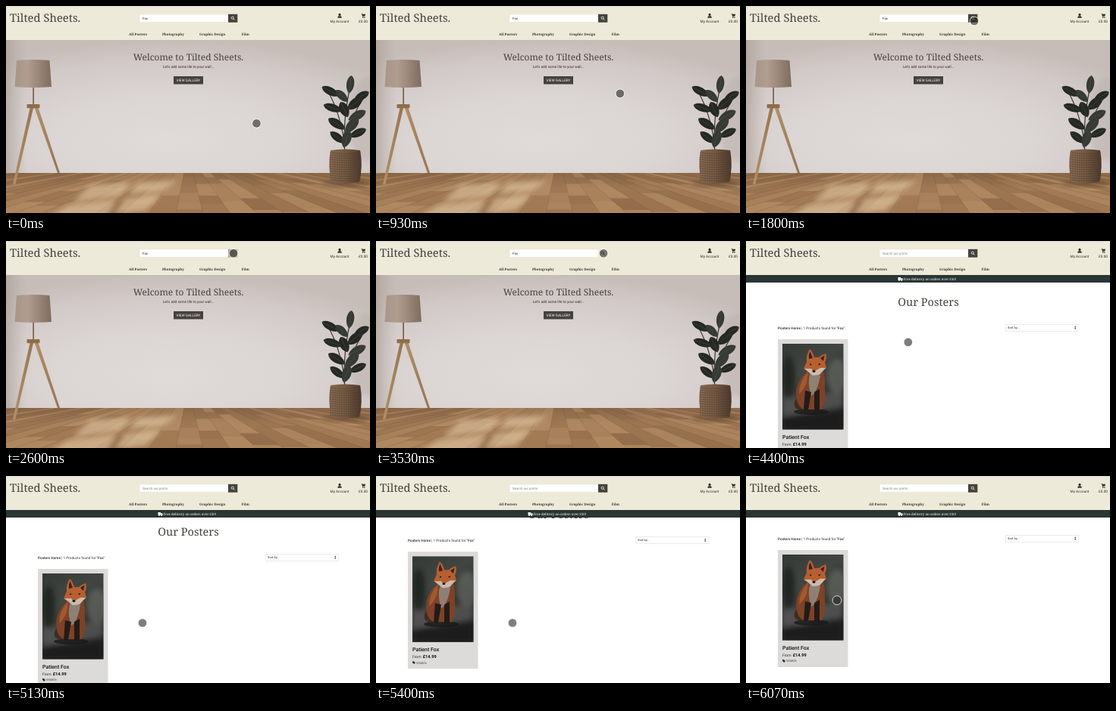
These frames come from a looping animation (480 px wide and 274 px high, 6140 ms). An HTML page:

```html
<!DOCTYPE html>
<html lang="en">
<head>
<meta charset="utf-8">
<title>Poster shop</title>
<style>
  html, body { margin: 0; width: 100%; height: 100%; overflow: hidden; background: #fff; }
  svg { display: block; width: 100vw; height: 100vh; }
  text { font-family: Roboto, sans-serif; font-size: 4.7px; fill: #2b2927; text-rendering: geometricPrecision; }
  .serif { font-family: "Noto Serif", serif; font-weight: 500; fill: #45413d; }
  .mid { text-anchor: middle; }
  .nav text { font-size: 4.45px; font-weight: 700; fill: #36332f; }
</style>
</head>
<body>
<svg viewBox="0 0 480 274" xmlns="http://www.w3.org/2000/svg">
  <defs>
    <radialGradient id="wall" cx=".45" cy=".75" r=".75">
      <stop offset="0" stop-color="#e0dad9"/>
      <stop offset=".45" stop-color="#dbd5d4"/>
      <stop offset=".8" stop-color="#d1c9c7"/>
      <stop offset="1" stop-color="#c6bdb9"/>
    </radialGradient>
    <linearGradient id="corner">
      <stop offset="0" stop-color="#a5988f" stop-opacity=".6"/>
      <stop offset="1" stop-color="#b5aaa4" stop-opacity="0"/>
    </linearGradient>
    <linearGradient id="floor" x2="0" y2="1">
      <stop offset="0" stop-color="#94704f"/>
      <stop offset=".4" stop-color="#a67f5a"/>
      <stop offset="1" stop-color="#a47c55"/>
    </linearGradient>
    <linearGradient id="shade">
      <stop offset="0" stop-color="#a8968a"/>
      <stop offset=".35" stop-color="#b09d90"/>
      <stop offset="1" stop-color="#806c5c"/>
    </linearGradient>
    <linearGradient id="wood">
      <stop offset="0" stop-color="#b3916a"/>
      <stop offset="1" stop-color="#957350"/>
    </linearGradient>
    <linearGradient id="pot">
      <stop offset="0" stop-color="#846850"/>
      <stop offset=".5" stop-color="#735842"/>
      <stop offset="1" stop-color="#4e3a2c"/>
    </linearGradient>
    <linearGradient id="dusk" x2=".5" y2="1">
      <stop offset="0" stop-color="#343936"/>
      <stop offset=".4" stop-color="#424643"/>
      <stop offset=".65" stop-color="#353735"/>
      <stop offset="1" stop-color="#1f2020"/>
    </linearGradient>
    <filter id="soft" x="-30%" y="-30%" width="160%" height="160%"><feGaussianBlur stdDeviation="3"/></filter>
    <filter id="fur"><feGaussianBlur stdDeviation=".45"/></filter>
    <clipPath id="print"><rect x="48" y="136" width="80.5" height="113.5"/></clipPath>
    <clipPath id="ground"><rect y="221" width="480" height="53"/></clipPath>
  </defs>

  <g id="home">
    <rect y="45" width="480" height="177" fill="url(#wall)"/>
    <rect y="45" width="28" height="177" fill="url(#corner)"/>
    <ellipse cx="476" cy="150" rx="26" ry="55" fill="#b3a8a2" opacity=".4" filter="url(#soft)"/>
    <rect y="221" width="480" height="53" fill="url(#floor)"/>
    <g clip-path="url(#ground)">
      <g id="planks" filter="url(#fur)"></g>
      <g fill="#e3c9a6" opacity=".6" filter="url(#soft)">
        <path d="M112 237 165 234 150 251 87 260Z"/>
        <path d="M175 234 225 231 208 244 160 250Z"/>
        <path d="M82 264 147 256 132 280 55 280Z"/>
        <path d="M157 255 205 249 185 270 142 276Z"/>
      </g>
      <ellipse cx="447" cy="235" rx="32" ry="4" fill="#4b3524" opacity=".5" filter="url(#soft)"/>
    </g>

    <path d="M35.300 106H37V131H35.300Z" fill="#7b6049"/>
    <path d="M32 133H36.500L12.500 236H9Z" fill="url(#wood)"/>
    <path d="M37 133H42L71 221H68Z" fill="url(#wood)"/>
    <rect x="27.500" y="130" width="17" height="5.300" rx="1" fill="#8f6d4b"/>
    <path d="M14 72Q36 70 57.500 72L60 107Q36 109 11.500 107Z" fill="url(#shade)"/>

    <path d="M447 196Q443 150 456 98M446 180Q440 140 425 114M449 175Q458 140 472 122" fill="none" stroke="#3a352b" stroke-width="1.2"/>
    <g id="leaves"></g>
    <path d="M428 191Q447 188 467 191 471 212 466 233 447 237 429 233 424 212 428 191Z" fill="url(#pot)"/>
    <g id="weave" fill="none" stroke="#3f2e22" stroke-width=".8" opacity=".6"></g>

    <text class="serif mid" x="240.500" y="72.300" style="font-size:12px">Welcome to Tilted Sheets.</text>
    <text class="mid" x="240.500" y="81.800">Let's add some life to your wall...</text>
    <rect x="221" y="93" width="39" height="10.500" fill="#45413d"/>
    <text class="mid" x="240.500" y="100.100" style="fill:#fff">VIEW GALLERY</text>
  </g>

  <g id="shop">
    <rect y="45" width="480" height="229" fill="#fff"/>
    <g id="scroll">
      <text class="serif mid" x="240.500" y="86.300" style="font-size:14.500px">Our Posters</text>
      <text x="42" y="116.700"><tspan font-weight="500">Posters Home</tspan> | 1 Products found for <tspan font-weight="500">"Fox"</tspan></text>
      <rect x="342.300" y="110.300" width="96.500" height="9" fill="#fff" stroke="#dedede" stroke-width=".6"/>
      <text x="345" y="116.200" style="font-size:4px">Sort by...</text>
      <path d="M433 114.300 434.200 112.600 435.400 114.300ZM433 115.300 434.200 117 435.400 115.300Z" fill="#333"/>
      <rect x="42" y="130" width="92.500" height="155" fill="#dcdbda"/>
      <g clip-path="url(#print)">
        <rect x="48" y="136" width="81" height="114" fill="url(#dusk)"/>
        <g filter="url(#soft)">
          <ellipse cx="120" cy="180" rx="13" ry="24" fill="#666a62" opacity=".7"/>
          <ellipse cx="56" cy="180" rx="9" ry="28" fill="#202522"/>
          <path d="M48 210 128 198V220L48 232Z" fill="#555655" opacity=".8"/>
          <path d="M48 234 128 224V250H48Z" fill="#1c1d1d"/>
        </g>
        <g filter="url(#fur)">
          <ellipse cx="86" cy="226" rx="23" ry="4" fill="#151515" opacity=".7"/>
          <path d="M70 205Q61 212 65 221 73 226 82 220Z" fill="#432b1f"/>
          <path d="M82 172Q67 183 66 203 67 219 76 223H100Q106 212 104 194 105 179 101 171Z" fill="#7d4227"/>
          <path d="M82 173Q70 185 70 202 75 199 80 188Z" fill="#a2592f"/>
          <path d="M85 174Q80 186 86 205 94 201 98 178Z" fill="#8f8074"/>
          <path d="M78 198 76 224H82L86 200ZM90 200 90 225H97L97 196Z" fill="#231b18"/>
          <path d="M84 143Q79 151 80 160L76 169 86 176 97 176 106 168 104 161Q107 154 105 149 99 151 96 154L90 154Q88 146 84 143Z" fill="#b75f30"/>
          <path d="M84.500 146Q82 151 83 156L88 155ZM103.500 151.500 98 155 102 159Z" fill="#37251d"/>
          <path d="M77 169 86 169 89 173 98 168 105 168 97 177 88 178Z" fill="#c9bbae"/>
          <path d="M84 162 87 163.500 84.500 164.500ZM95 163 98.500 162 97 164.500Z" fill="#17120f"/>
          <ellipse cx="89.500" cy="172.500" rx="2" ry="1.400" fill="#15120f"/>
        </g>
      </g>
      <text x="48" y="262.200" style="font-size:7px;font-weight:500;fill:#111">Patient Fox</text>
      <text x="48" y="270.500" style="font-size:5px">From</text>
      <text x="61.700" y="270.500" style="font-size:5.700px;font-weight:700;fill:#111">£14.99</text>
      <path d="M48 275H50L52 277 50.200 278.900 48 276.800Z" fill="#333"/>
      <text x="53" y="278.400" style="font-size:4.200px;fill:#555">Wildlife</text>
    </g>
    <rect y="45" width="480" height="10" fill="#2a3634"/>
    <path d="M200.500 48H204V51.700H200.500ZM204.400 49H205.700L206.600 50.300V51.700H204.400Z" fill="#fff"/>
    <circle cx="202" cy="52" r=".9" fill="#fff"/><circle cx="205.200" cy="52" r=".9" fill="#fff"/>
    <text class="serif" x="207.500" y="51.900" style="font-size:4.400px;fill:#fff">Free delivery on orders over £50!</text>
  </g>

  <rect width="480" height="45" fill="#edead9"/>
  <rect width="480" height="1.200" fill="#dddcd7"/>
  <text class="serif" x="5" y="21.400" style="font-size:14.800px">Tilted Sheets.</text>
  <rect x="176" y="11" width="117" height="10.500" fill="#fff" stroke="#dad7c9" stroke-width=".4"/>
  <text id="query" x="180" y="18" style="font-size:4.400px"></text>
  <rect id="button" x="293" y="10.800" width="12.300" height="10.900"/>
  <g id="lens" fill="none" stroke-width=".9"><circle cx="298.700" cy="15.700" r="1.600"/><path d="M299.900 16.900 301.500 18.500"/></g>
  <g class="nav">
    <text class="serif" x="162" y="38.800">All Posters</text>
    <text class="serif" x="206" y="38.800">Photography</text>
    <text class="serif" x="255" y="38.800">Graphic Design</text>
    <text class="serif" x="310.500" y="38.800">Film</text>
  </g>
  <g fill="#302d2a">
    <circle cx="440" cy="11.400" r="1.600"/>
    <path d="M437.200 15.800Q437.200 13.300 439 13.300H441Q442.800 13.300 442.800 15.800Z"/>
    <path d="M468.500 10H469.700L470 10.800H474L473.300 13.400H470.500L470.600 14H473.300V14.600H470L469.200 10.600H468.500Z"/>
    <circle cx="470.600" cy="15.400" r=".6"/><circle cx="472.900" cy="15.400" r=".6"/>
  </g>
  <text class="mid" x="440" y="22">My Account</text>
  <text class="mid" x="471" y="22">£0.00</text>

  <g id="cursor">
    <circle r="5.600" fill="#282826" fill-opacity=".6"/>
    <circle r="5.900" fill="none" stroke="#fff" stroke-opacity=".75"/>
  </g>
</svg>
<script>
const LOOP = 6140, PAGE_CHANGE = 3670;
const $ = id => document.getElementById(id);
const mix = (a, b, p) => a + (b - a) * p;
const ramp = (t, from, to) => Math.min(1, Math.max(0, (t - from) / (to - from)));
const ease = (t, from, to) => { const p = ramp(t, from, to); return p * p * (3 - 2 * p); };
const blend = (a, b, p) => `rgb(${a.map((v, i) => Math.round(mix(v, b[i], p)))})`;

let seed = 11;
const random = () => (seed = seed * 16807 % 2147483647) / 2147483647;

// Short boards lie along rays from a vanishing point behind the wall.
function drawPlanks() {
  const horizon = 195, step = .45;
  const point = (k, y) => `${240 + k * (y - horizon)} ${y}`;
  let out = "";
  for (let k = -11; k < 11; k += step) {
    for (let y = 215 + random() * 6; y < 274;) {
      const end = y + 8 + random() * 26;
      const tone = random() < .55 ? "#6e4d33" : "#cfa87d";
      out += `<path d="M${point(k, y)}L${point(k + step, y)}L${point(k + step, end)}L${point(k, end)}Z"
        fill="${tone}" opacity="${.06 + random() * .24}"/>`;
      y = end;
    }
    out += `<path d="M${point(k, 221)}L${point(k, 274)}" stroke="#5f432d" stroke-width=".5" opacity=".35"/>`;
  }
  $("planks").innerHTML = out;
}

function drawPlant() {
  const leaves = [
    [454, 104, 5, 12, 8], [428, 113, 5, 13, -62], [469, 119, 5, 11, 62],
    [443, 119, 5, 11, -45], [460, 129, 6, 12, 50], [431, 135, 5, 13, -72],
    [463, 145, 5.5, 13, 62], [446, 137, 6, 11, -25], [436, 156, 5.5, 13, -58],
    [456, 158, 6, 13, 42], [464, 168, 5, 12, 65], [437, 174, 5, 12, -52],
    [449, 176, 6, 12, 18]
  ];
  $("leaves").innerHTML = leaves.map(([x, y, rx, ry, a], i) =>
    `<g transform="translate(${x} ${y}) rotate(${a})">
      <path d="M0 ${-ry}C${rx * 1.5} ${-ry * .6} ${rx * 1.2} ${ry * .6} 0 ${ry}C${-rx * 1.2} ${ry * .6} ${-rx * 1.5} ${-ry * .6} 0 ${-ry}Z" fill="${i % 3 ? "#262824" : "#363a35"}"/>
      <path d="M0 ${1 - ry}V${ry}" stroke="#565a52" stroke-width=".4"/></g>`).join("");
  let rows = "";
  for (let y = 194; y < 233; y += 3) rows += `<path d="M427 ${y}Q447 ${y + 3} 468 ${y}" stroke-dasharray="2 1"/>`;
  $("weave").innerHTML = rows;
}

function cursorAt(t) {
  if (t < PAGE_CHANGE) {
    const p = ease(t, 470, 1760), q = ease(t, 1800, 2330);
    return [mix(330.4, 301, p) - q, mix(155.4, 20, p) - 3.7 * q];
  }
  const p = ease(t, 4000, 4670), r = 1 - p;
  const curve = (a, c, b) => r * r * a + 2 * p * r * c + p * p * b;
  const q = ease(t, 5760, 6070);
  return [curve(300, 221, 180) - 60 * q, curve(16.3, 111, 194.5) - 30 * q];
}

function draw(t) {
  const home = t < PAGE_CHANGE;
  $("home").style.display = home ? "" : "none";
  $("shop").style.display = home ? "none" : "";
  $("query").textContent = home ? "Fox" : "Search our prints";
  $("query").style.fill = home ? "#222" : "#85817c";
  const hover = home ? ramp(t, 2430, 2730) : 0;
  const dark = [69, 65, 61], cream = [237, 234, 217];
  $("button").setAttribute("fill", blend(dark, cream, hover));
  $("lens").setAttribute("stroke", blend(cream, dark, hover));
  $("scroll").setAttribute("transform", `translate(0 ${-32 * ease(t, 4980, 5480)})`);
  $("cursor").setAttribute("transform", `translate(${cursorAt(t)})`);
}

drawPlanks();
drawPlant();
const start = performance.now();
function tick() {
  draw((performance.now() - start) % LOOP);
  requestAnimationFrame(tick);
}
tick();
</script>
</body>
</html>
```
